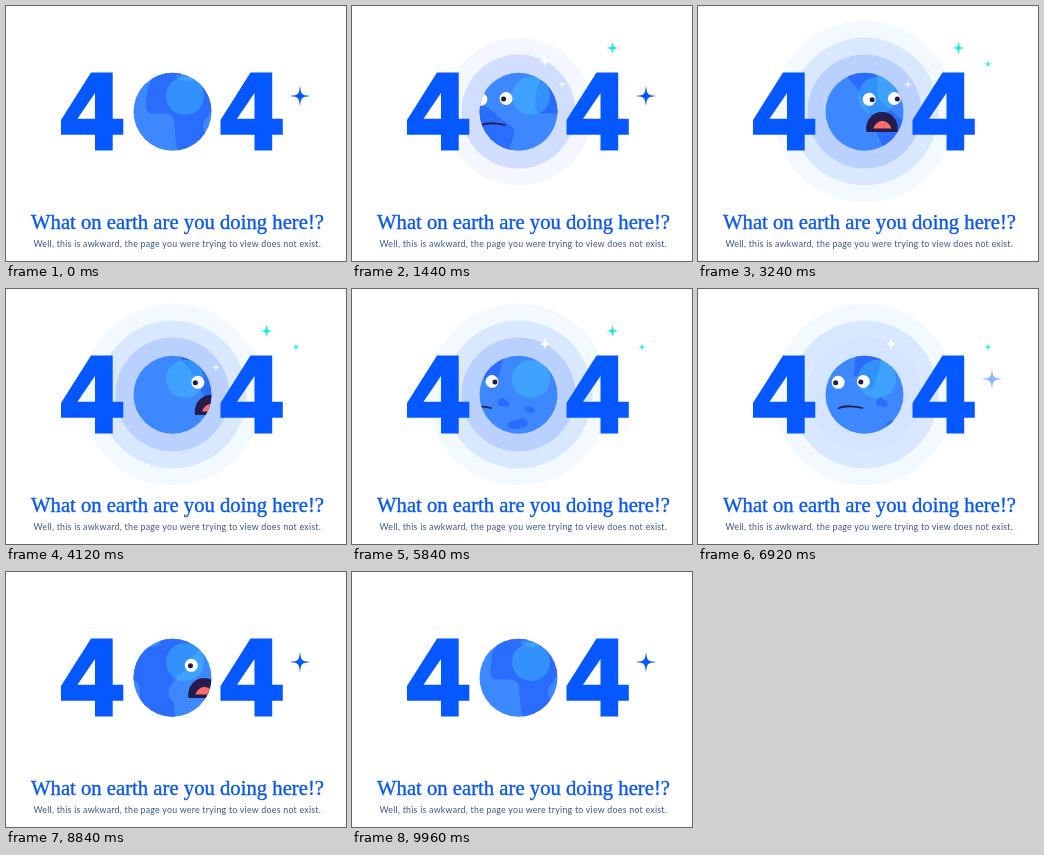
An HTML page that plays this animation: 340 by 255 pixels, repeating every 10000 ms.

```html
<!DOCTYPE html>
<html lang="en">
<head>
<meta charset="utf-8">
<title>404</title>
<style>
  html, body { margin: 0; width: 100%; height: 100%; overflow: hidden; background: #fff; }
  svg { display: block; width: 340px; height: 255px; }
  text { text-anchor: middle; }
  .title { font: 20.7px "Liberation Serif", serif; fill: #0857f0; stroke: #0857f0; stroke-width: .35px; }
  .note { font: 8.8px Lato, sans-serif; letter-spacing: .255px; fill: #3c5690; }
</style>
</head>
<body>
<svg viewBox="0 0 340 255">
  <defs>
    <clipPath id="globe"><circle cx="166.500" cy="105.700" r="39"/></clipPath>
    <path id="four" fill-rule="evenodd" d="M85 66.600H106.700V112.700H117.300V128.700H106.700V144.600H89V128.700H55V114ZM89 87L71.500 112.700H89Z"/>
    <g id="land">
      <path fill-rule="evenodd" d="M150 64C148 74 141 76 141 88C139 98 138 107 146 107.500C156 108 166 106 168 114C169 124 169 136 172 148H206C199 140 208 133 199 127C195 120 198 113 203 110C205 100 213 102 216 96C217 86 224 84 229 76L236 64ZM169 70C173 67 187 67 189 70C187 77 175 77 169 70Z"/>
      <path d="M50 64C51 76 61 76 64 88C67 100 75 102 78 116C82 130 86 134 89 148H115C113 138 120 132 119 124C113 115 104 114 100 107C93 103 89 98 84 93C80 82 84 74 80 64Z"/>
      <path d="M-50 64H-23C-21 70 -27 72 -26 78C-28 86 -30 88 -31 97C-34 102 -40 100 -41 94C-43 88 -46 85 -52 88Z"/>
      <path d="M-30 114C-28 109 -24 107 -22 111C-17 112 -16 117 -21 118C-25 116 -28 119 -30 114Z"/>
      <path d="M-3 119C0 116 7 118 8 122C7 126 -2 124 -3 119Z"/>
      <path d="M-20 136C-17 130 -10 132 -6 129C0 129 3 135 -2 138C-7 137 -14 144 -20 136Z"/>
    </g>
  </defs>

  <g id="rings">
    <circle cx="166.500" cy="105.500" r="91" fill="rgb(0 149 255 / .047)"/>
    <circle cx="166.500" cy="105.500" r="74" fill="rgb(0 75 255 / .103)"/>
    <circle cx="166.500" cy="105.500" r="57" fill="rgb(0 80 255 / .147)"/>
  </g>
  <g id="stars"></g>

  <g fill="#0558ff">
    <use href="#four"/>
    <use href="#four" x="159.500"/>
  </g>

  <g clip-path="url(#globe)">
    <rect x="127" y="66" width="80" height="80" fill="#3d88ff"/>
    <g id="map" fill="#2a6cfb">
      <use href="#land"/>
      <use href="#land" x="-300"/>
    </g>
    <circle cx="179" cy="90" r="19" fill="#42c8ff" fill-opacity=".4"/>
    <g id="face">
      <g fill="#fff">
        <circle cx="-13.200" cy="93.300" r="6.500"/>
        <circle cx="12" cy="92.500" r="6.500"/>
      </g>
      <g id="pupils" fill="#1f1a4a">
        <circle cx="-13.200" cy="93.800" r="2.500"/>
        <circle cx="12" cy="93" r="2.500"/>
      </g>
      <path id="mouth" fill="#231c4c" stroke="#231c4c" stroke-width="1.800" stroke-linejoin="round"/>
      <path id="tongue" fill="#ff6b66" d="M-9 122.500C-6 112.500 6 112.500 9 122.500Z"/>
    </g>
  </g>

  <text class="title" x="171.500" y="222.500">What on earth are you doing here!?</text>
  <text class="note" x="171.300" y="241">Well, this is awkward, the page you were trying to view does not exist.</text>
</svg>
<script>
const LOOP = 10, CYCLE = 5, MAP_WIDTH = 300, FACE_SPEED = 23.5;
const $ = id => document.getElementById(id);

// Linear interpolation through [time, value] steps.
function at(steps, t) {
  if (t <= steps[0][0]) return steps[0][1];
  for (let i = 1; i < steps.length; i++) {
    const [t0, a] = steps[i - 1], [t1, b] = steps[i];
    if (t < t1) return a + (b - a) * (t - t0) / (t1 - t0);
  }
  return steps[steps.length - 1][1];
}

const shown = (from, to) => [[from, 0], [from + .5, 1], [to, 1], [to + .5, 0]];
const hidden = (from, to) => [[from, 1], [from + .5, 0], [to, 0], [to + .5, 1]];

const stars = [
  { x: 294, y: 90, r: 10.3, fill: '#0558ff', fade: hidden(1.9, 6.7) },
  { x: 260.5, y: 42, r: 6.8, fill: '#16efd0', fade: shown(.4, 5.95) },
  { x: 290, y: 58, r: 4.3, fill: '#16efd0', fade: shown(2.4, 8.1) },
  { x: 193, y: 55, r: 6.8, fill: '#fff', fade: hidden(1.9, 4.5) },
  { x: 210, y: 78.5, r: 4.4, fill: '#fff', fade: shown(.6, 4.3) }
];

function starPath({ x, y, r }) {
  const k = r * .12;
  const curve = (cx, cy, ex, ey) => `C${[cx, cy, cx, cy, ex, ey]}`;
  return `M${x} ${y - r}` +
    curve(x + k, y - k, x + r, y) + curve(x + k, y + k, x, y + r) +
    curve(x - k, y + k, x - r, y) + curve(x - k, y - k, x, y - r) + 'Z';
}

for (const star of stars) {
  star.el = document.createElementNS('http://www.w3.org/2000/svg', 'path');
  star.el.setAttribute('d', starPath(star));
  star.el.setAttribute('fill', star.fill);
  $('stars').append(star.el);
}

const ringFades = [shown(2, 8.4), shown(1.22, 7.45), shown(.5, 6.5)];
const rings = [...$('rings').children];

const gaze = [[1, 3], [1.3, -2.5], [2.4, -2.5], [2.88, -.5], [3.15, 3], [3.6, 3], [3.95, -2.5]];
const opening = [[2, 0], [2.3, 1]];
const flat = [-12.5, 119.3, -7, 116.3, 4, 117, 11, 119, 4, 117, -7, 116.3, -12.5, 119.3];
const open = [-15.3, 125, -17, 101, 16.5, 101, 14.5, 125, 8, 125, -8, 125, -15.3, 125];

function mouthPath(k) {
  const p = flat.map((v, i) => v + (open[i] - v) * k);
  return `M${p.slice(0, 2)}C${p.slice(2, 8)}C${p.slice(8)}Z`;
}

const slide = (id, x) => $(id).setAttribute('transform', `translate(${x} 0)`);

function draw(t) {
  const c = t % CYCLE, k = at(opening, c);
  slide('map', t / LOOP * MAP_WIDTH);
  slide('face', 108.2 + FACE_SPEED * c);
  slide('pupils', at(gaze, c));
  $('mouth').setAttribute('d', mouthPath(k));
  $('tongue').setAttribute('opacity', k);
  rings.forEach((ring, i) => ring.setAttribute('opacity', at(ringFades[i], t)));
  for (const s of stars) s.el.setAttribute('opacity', at(s.fade, t));
}

const start = performance.now();
function tick(now) {
  draw(Math.max(0, now - start) / 1000 % LOOP);
  requestAnimationFrame(tick);
}
draw(0);
requestAnimationFrame(tick);
</script>
</body>
</html>
```
